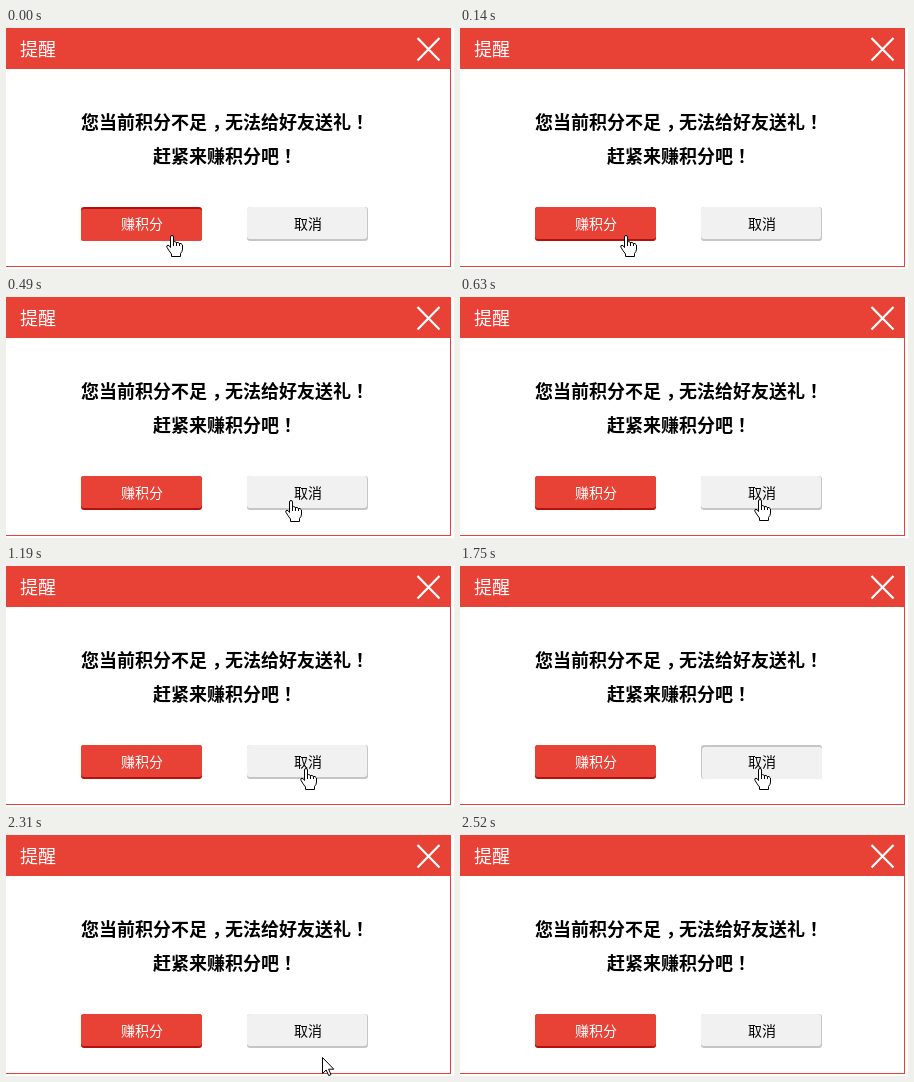
Animation, 448 px wide and 241 px high, one loop 3570 ms. Source, as an HTML page:

```html
<!DOCTYPE html>
<html lang="zh-CN">
<head>
<meta charset="utf-8">
<title>提醒</title>
<style>
  html, body { margin: 0; width: 100%; height: 100%; overflow: hidden; background: #fff; }
  svg { display: block; width: 448px; height: 241px; }
  text { font-family: "Noto Sans CJK SC", "Noto Sans CJK", sans-serif; }
  .message { font-size: 18px; font-weight: 700; }
  .mark { font-family: "Noto Sans CJK JP", "Noto Sans CJK", sans-serif; }
  .label { font-size: 14px; }
  .cursor { fill: #fff; stroke: #000; stroke-linejoin: round; }
</style>
</head>
<body>
<svg viewBox="0 0 448 241">
  <rect width="448" height="241" fill="#fff"/>
  <path d="M0 0H445V239H0V238H444V41H0Z" fill="#e84135"/>
  <text x="14" y="28" font-size="18" fill="#fff">提醒</text>
  <path d="M411.5 10L433.5 32.5M433.5 10L411.5 32.5" stroke="#fff" stroke-width="2.2"/>

  <g class="message">
    <text x="75" y="101">您当前积分不足</text>
    <text class="mark" x="206" y="101">，</text>
    <text x="219" y="101">无法给好友送礼</text>
    <text class="mark" x="345" y="101">！</text>
    <text x="147" y="135">赶紧来赚积分吧</text>
    <text class="mark" x="273" y="135">！</text>
  </g>

  <rect x="75" y="179" width="121" height="34" rx="3" fill="#b3120c"/>
  <rect id="earn" x="75" width="121" height="32" rx="3" fill="#e84135"/>
  <text class="label" x="115" y="201" fill="#fff">赚积分</text>

  <rect x="241" y="179" width="121" height="34" rx="3" fill="#c6c6c6"/>
  <rect id="cancel" width="120" height="32" rx="3" fill="#f1f1f1"/>
  <text class="label" x="288" y="201">取消</text>

  <g id="hand" class="cursor">
    <path d="M4.5 12.5V2Q4.5 .5 6 .5T7.5 2V7Q8.5 5.8 10.5 7.5Q12 6.8 13.5 8.5Q15 7.8 16.5 10V14Q16.5 16.5 14.5 18.5V21.5H5.5V19Q3 16 .9 12.2Q.3 10.3 2 10.2Q3.5 10.5 4.5 12.5Z"/>
    <path d="M7.5 7V11M10.5 7.5V11M13.5 8.5V11" fill="none"/>
  </g>
  <path id="arrow" class="cursor" d="M.5 .5V16.5L4.2 13L6.7 18.6L9 17.6L6.6 12.2H11.8Z"/>
</svg>
<script>
  const LOOP = 3570;
  const $ = id => document.getElementById(id);
  const earn = $("earn"), cancel = $("cancel"), hand = $("hand"), arrow = $("arrow");

  // Start time, cursor, left, top
  const path = [
    [0, hand, 160, 207],
    [280, arrow, 211, 206],
    [350, hand, 243, 204],
    [420, hand, 264, 203],
    [490, hand, 279, 203],
    [560, hand, 289, 202],
    [630, hand, 294, 202],
    [2310, arrow, 316, 222],
    [2380, arrow, 324, 230],
    [2450, arrow, 330, 237],
    [2520, null, 0, 0]
  ];

  const within = (t, from, to) => t >= from && t < to;

  function draw(t) {
    const earnDown = within(t, 0, 140);
    const cancelDown = within(t, 980, 1190) || within(t, 1750, 1960);
    earn.setAttribute("y", earnDown ? 181 : 179);
    cancel.setAttribute("x", cancelDown ? 242 : 241);
    cancel.setAttribute("y", cancelDown ? 181 : 179);

    const [, shape, x, y] = path.filter(step => step[0] <= t).pop();
    for (const cursor of [hand, arrow]) {
      cursor.setAttribute("visibility", cursor === shape ? "visible" : "hidden");
      cursor.setAttribute("transform", `translate(${x} ${y})`);
    }
  }

  const start = performance.now();
  function tick() {
    draw((performance.now() - start) % LOOP);
    requestAnimationFrame(tick);
  }
  tick();
</script>
</body>
</html>
```
